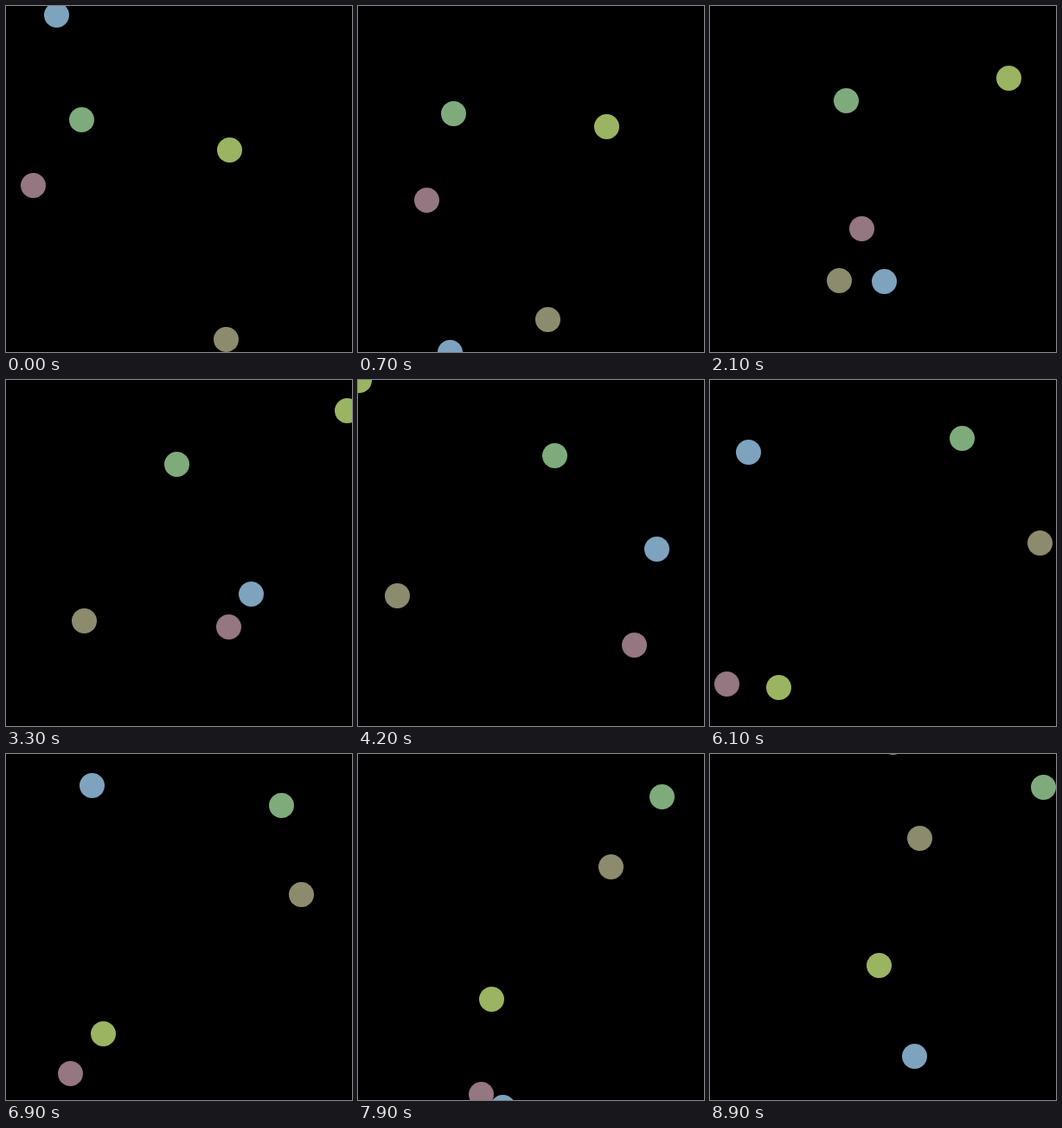
An HTML page for the animation above (9000 ms loop, 400x400 px).

```html
<!DOCTYPE html>
<html lang="en">
<head>
<meta charset="utf-8">
<title>Drifting dots</title>
<style>
  html, body { margin: 0; width: 100%; height: 100%; overflow: hidden; background: #000; }
  svg { display: block; width: 100%; height: 100%; }
</style>
</head>
<body>
<svg id="stage" viewBox="0 0 400 400"></svg>
<script>
const LOOP = 9000, STEP = 100;
const RADIUS = 14.5, MARGIN = 15.4, SPAN = 400 + 2 * MARGIN;

// Start position and velocity in pixels per step.
const dots = [
  { color: '#7da3be', x: 58.25, y: 11, vx: 6.838, vy: -5.8735 },
  { color: '#7fab7c', x: 87.3, y: 131.6, vx: 3.349, vy: -1.044 },
  { color: '#9bb462', x: 258.5, y: 166.95, vx: 4.133, vy: -3.973 },
  { color: '#947780', x: 31.5, y: 207.9, vx: 6.86, vy: 2.3478 },
  { color: '#8d8b6d', x: 254.4, y: 385.5, vx: -4.977, vy: -3.233 }
];

const stage = document.getElementById('stage');
for (const dot of dots) {
  dot.node = document.createElementNS('http://www.w3.org/2000/svg', 'circle');
  dot.node.setAttribute('r', RADIUS);
  dot.node.setAttribute('fill', dot.color);
  stage.append(dot.node);
}

// Leaving one edge brings a dot back at the opposite one, snapped to whole pixels.
function wrap(value) {
  const shifted = (((value + MARGIN) % SPAN) + SPAN) % SPAN;
  return Math.floor(shifted - MARGIN) + 0.5;
}

function render(time) {
  const step = Math.floor((time % LOOP) / STEP);
  for (const { node, x, y, vx, vy } of dots) {
    node.setAttribute('cx', wrap(x + vx * step));
    node.setAttribute('cy', wrap(y + vy * step));
  }
}

const start = performance.now();
function tick() {
  render(performance.now() - start);
  requestAnimationFrame(tick);
}
tick();
</script>
</body>
</html>
```
